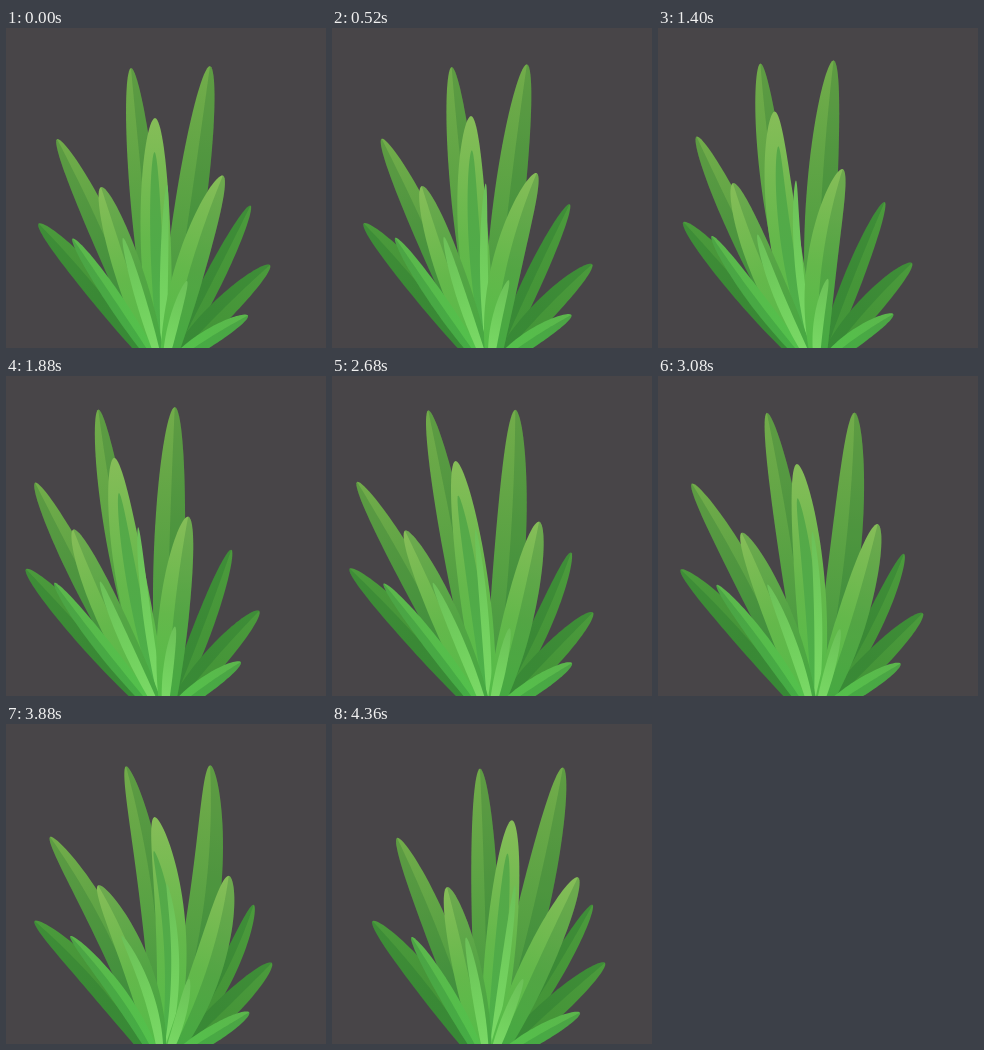
Animation of 320 by 320 pixels, one loop 4400 ms. Source, as an HTML page with a canvas:

```html
<!DOCTYPE html>
<html lang="en">
<head>
<meta charset="utf-8">
<title>Swaying plant</title>
<style>
html, body { margin: 0; width: 100%; height: 100%; overflow: hidden; background: #484548; }
canvas { display: block; width: 320px; height: 320px; }
</style>
</head>
<body>
<canvas id="stage" width="320" height="320"></canvas>
<script>
const ctx = document.getElementById('stage').getContext('2d');
const LOOP = 4400, STEP = 40, SEGMENTS = 36;
const LEAD_TIME = 400;   // the middle of a leaf moves ahead of its tip
const SHADE = 'rgba(16, 92, 44, 0.2)';

// gusts reaching the right side early and the left side late
const TIMES = [0, 1000, 1880, 2680, 3520, 3880, 4360, 4760];
const EARLY = [0, -0.86, -1.2, -0.34, 0.45, 0.2, 1, 0.6];
const LATE = [0, -0.36, -1.57, -1.86, -0.43, -0.5, 1, 0.6];

// gradients from tip to base
const BACK = ['#72ac4a', '#57a143', '#3f9440'];
const LOW = ['#4b9a3c', '#459538', '#40963a'];
const FRONT = ['#86bd58', '#64b84b', '#50bd47'];
const SMALL = ['#5cb64c', '#56bd4b', '#52c24c'];
const SLIVER = ['#57a848', '#50ab48', '#4bb449'];
const PALE = ['#6cc058', '#72d05e', '#7cdc68'];

// tip x and y, bow of the spine, half width, sway in pixels,
// gust (0 late, 1 early), shaded half (-1 left, 1 right, 0 none)
const leaf = (x, y, bow, width, sway, gust, colors, side) =>
  ({ x, y, bow, width, sway, gust, colors, side });

const plant = [
  leaf(125, 40, 2, 13.5, 23, 0.4, BACK, 1),
  leaf(204, 38, 7, 15.5, 27, 0.72, BACK, 1),
  leaf(51, 111, 9, 13, 14, 0, BACK, -1),
  leaf(32.5, 195.5, 8, 12, 8, 0, LOW, -1),
  leaf(244.5, 177.5, 5, 9.5, 16, 1, LOW, -1),
  leaf(264, 237, -3, 11.5, 9, 1, LOW, -1),
  leaf(149, 90, 0, 15, 31, 0.68, FRONT, 0),
  leaf(148.5, 124, 2, 6, 27, 0.68, SLIVER, 0),
  leaf(161, 157, 2, 4, 22, 0.7, PALE, 0),
  leaf(95, 159, 3, 14, 20, 0.5, FRONT, 1),
  leaf(66.5, 210.5, 3, 8, 13, 0.47, SMALL, -1),
  leaf(217, 147.5, -3, 15, 29, 1, FRONT, 1),
  leaf(117, 210, 2, 5, 17, 0.6, PALE, 0),
  leaf(181, 253, -2, 5, 10, 1, PALE, 0),
  leaf(242, 287.5, -3, 8.5, 6, 1, SMALL, 1)
];

const mix = (a, b, k) => a + (b - a) * k;

function slope(v, i) {
  const a = Math.max(0, i - 1), b = Math.min(v.length - 1, i + 1);
  const s = (v[b] - v[a]) / (TIMES[b] - TIMES[a]);
  return b - a === 2 ? s : s / 2;
}

// cubic interpolation through the key values
function at(v, t) {
  let i = 0;
  while (i < TIMES.length - 2 && t > TIMES[i + 1]) i++;
  const h = TIMES[i + 1] - TIMES[i], u = Math.min(1, (t - TIMES[i]) / h), w = 1 - u;
  return v[i] * w * w * (1 + 2 * u) + v[i + 1] * u * u * (3 - 2 * u) +
    h * u * w * (slope(v, i) * w - slope(v, i + 1) * u);
}

const swayOf = (l, t) => l.sway * mix(at(LATE, t), at(EARLY, t), l.gust);

// short dip of the whole plant near the end of the loop
const dip = t => 3.2 * Math.exp(-(((t - 3880) / 200) ** 2));

function profile(u) {
  const m = 0.52;
  if (u < m) return Math.pow(1 - (1 - u / m) ** 2, 0.54);
  return 1 - 0.55 * ((u - m) / (1 - m)) ** 2;
}

function fill(points, style) {
  ctx.fillStyle = style;
  ctx.beginPath();
  points.forEach(p => ctx.lineTo(p[0], p[1]));
  ctx.closePath();
  ctx.fill();
}

function drawLeaf(l, t) {
  const dx = swayOf(l, t), mid = swayOf(l, t + LEAD_TIME) * 0.9;
  const x0 = l.x + dx;
  const y0 = l.y + dx * 0.2 + dip(t) * Math.min(1, (320 - l.y) / 180);
  const bx = 157 + (l.x - 150) * 0.06, by = 338;
  const len = Math.hypot(bx - l.x, by - l.y);
  const cx = (l.x + bx) / 2 + l.bow * (by - l.y) / len + mid;
  const cy = (y0 + by) / 2 - l.bow * (bx - l.x) / len;
  const left = [], right = [], spine = [];
  for (let i = 0; i <= SEGMENTS; i++) {
    const u = (i / SEGMENTS) ** 1.6, w = 1 - u;
    const x = w * w * x0 + 2 * u * w * cx + u * u * bx;
    const y = w * w * y0 + 2 * u * w * cy + u * u * by;
    const tx = mix(cx - x0, bx - cx, u), ty = mix(cy - y0, by - cy, u);
    const k = l.width * profile(u) / Math.hypot(tx, ty);
    left.push([x - ty * k, y + tx * k]);
    right.push([x + ty * k, y - tx * k]);
    spine.push([x, y]);
  }
  const g = ctx.createLinearGradient(x0, y0, bx, by);
  l.colors.forEach((c, i) => g.addColorStop(i / 2, c));
  fill([...left, ...right.slice().reverse()], g);
  if (l.side) fill([...(l.side < 0 ? left : right), ...spine.reverse()], SHADE);
}

function draw(now) {
  const t = Math.floor((now % LOOP) / STEP) * STEP;
  ctx.fillStyle = '#484548';
  ctx.fillRect(0, 0, 320, 320);
  plant.forEach(l => drawLeaf(l, t));
}

let start = null;
function tick(now) {
  if (start === null) start = now;
  draw(now - start);
  requestAnimationFrame(tick);
}
draw(0);
requestAnimationFrame(tick);
</script>
</body>
</html>
```
